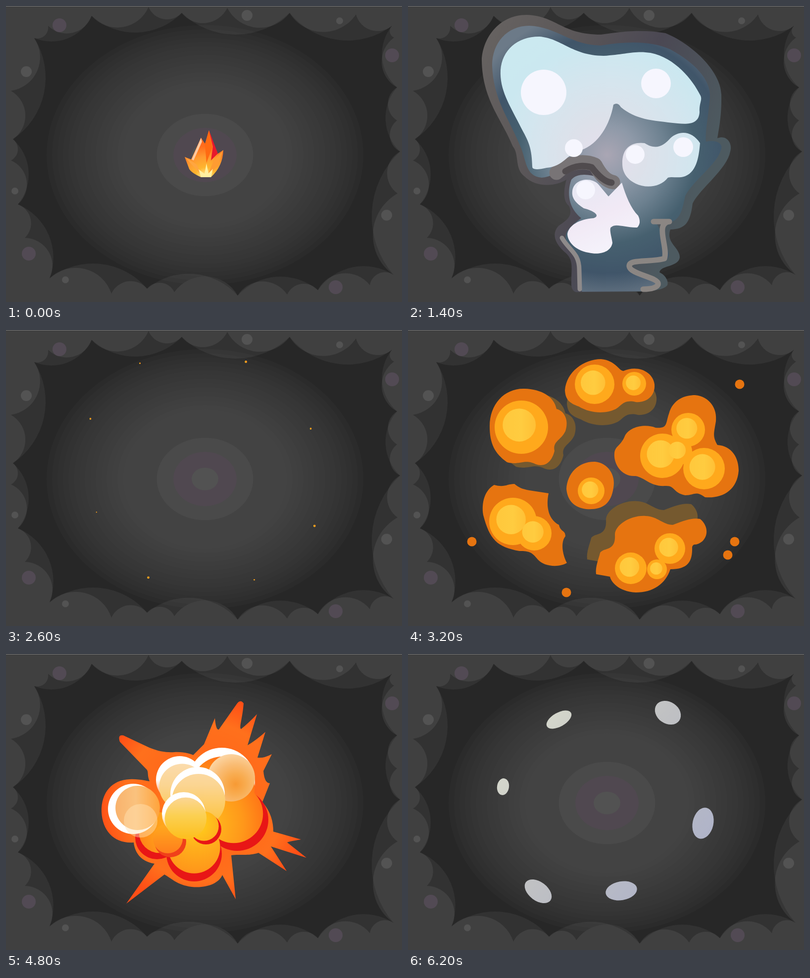
Recreate the animation shown at these times as an HTML page with a canvas. Size 800 by 600 pixels, loop 6.3 s.

```html
<!DOCTYPE html>
<html lang="en">
<head>
<meta charset="utf-8">
<title>Blasts</title>
<style>
html, body { margin: 0; width: 100%; height: 100%; overflow: hidden; background: #272727; }
canvas { display: block; width: 800px; height: 600px; }
</style>
</head>
<body>
<canvas id="stage" width="800" height="600"></canvas>
<script>
const STEP = 100, PER_BLAST = 9, TAU = Math.PI * 2;
const screen = document.getElementById('stage').getContext('2d');
let g = screen;

const noise = n => { const v = Math.sin(n * 12.9898) * 43758.5453; return v - Math.floor(v); };
const cache = {};
const shape = d => cache[d] || (cache[d] = new Path2D(d));
function fill(d, color, rule = 'nonzero') { g.fillStyle = color; g.fill(shape(d), rule); }
function line(d, color, width) { g.strokeStyle = color; g.lineWidth = width; g.stroke(shape(d)); }
function oval(x, y, rx, ry, color, turn = 0) {
  g.fillStyle = color;
  g.beginPath();
  g.ellipse(x, y, rx, ry, turn, 0, TAU);
  g.fill();
}
const disc = (x, y, r, color) => oval(x, y, r, r, color);
function stops(grad, colors) {
  colors.forEach((c, i) => grad.addColorStop(i / (colors.length - 1), c));
  return grad;
}
const radial = (x, y, r, ...colors) => stops(g.createRadialGradient(x, y, 0, x, y, r), colors);
const linear = (x0, y0, x1, y1, ...colors) => stops(g.createLinearGradient(x0, y0, x1, y1), colors);

// Draws a part moved away from the middle and resized about its own centre.
function part([x, y], { spread, size }, draw) {
  g.save();
  g.translate(400 + (x - 400) * spread, 300 + (y - 300) * spread);
  g.scale(size, size);
  g.translate(-x, -y);
  draw();
  g.restore();
}
const zoom = (size, draw) => part([400, 300], { spread: 1, size }, draw);
const middle = items => [0, 1].map(k => items.reduce((sum, it) => sum + it[k], 0) / items.length);

// Grows until the peak step, then drifts on and shrinks away.
function burst(i, peak, drift = .04) {
  const p = (i + 1) / (peak + 1), late = i - peak;
  return late <= 0
    ? { spread: Math.sin(p * TAU / 4), size: Math.sqrt(p) }
    : { spread: 1 + drift * late, size: 1 - late / (PER_BLAST - peak) };
}

// --- cave ---
const cusps = [[57,65],[85,40],[173,20],[288,2],[355,14],[447,4],[573,14],[707,17],[780,40],[784,64],
  [790,165],[790,232],[796,295],[791,380],[783,545],[735,566],[630,576],[568,585],[468,587],[340,580],
  [285,573],[213,583],[88,552],[38,470],[24,402],[10,313],[14,270],[10,172]];
const bubbles = [[108,39],[780,100],[46,502],[666,570],[487,19],[41,133],[769,424],[674,30],[18,375],[120,555]];

// The wall around the opening: arcs bulging inward from cusp to cusp.
function wall(points, curve) {
  const arcs = points.map(([x, y], i) => {
    const [u, v] = points[(i + 1) % points.length], r = curve * Math.hypot(u - x, v - y);
    return `A${r} ${r} 0 0 0 ${u} ${v}`;
  });
  return `M0 0H800V600H0ZM${points[0]}${arcs.join('')}Z`;
}
function cave() {
  g.fillStyle = '#272727';
  g.fillRect(0, 0, 800, 600);
  for (let i = 0; i <= 14; i++) {
    const r = 320 - i * 11, v = Math.round(43 + 24 * Math.pow(i / 14, .8));
    oval(402, 302, r, r * (.88 - r * .00018), `rgb(${v},${v},${v})`);
  }
  oval(402, 302, 97.5, 83.5, '#4a4a4a');
  oval(402, 302, 64, 55, '#504850');
  oval(402, 302, 27, 23, '#525252');
  fill(wall(cusps, .59), '#363636', 'evenodd');
  fill(wall(cusps.filter((_, i) => i % 2 === 0), .72), 'rgba(255,255,255,.05)', 'evenodd');
  bubbles.forEach(([x, y], i) => disc(x, y, i < 4 ? 14 : i < 7 ? 11 : 7, i < 4 ? '#524a54' : '#535353'));
  g.fillStyle = '#777';
  g.fillRect(0, 0, 800, 1);
}

// --- shared puffs ---
function moon(x, y, r, rim, body, dx, dy, k = .94) {
  disc(x, y, r, rim);
  disc(x + dx, y + dy, r * k, body);
}
const FIRE = ['#ff7a1e', '#e81818', '#ffa41a', '#ffd23c'];
const FROST = ['#64646a', '#5d7486', '#cfe6ef', '#f6f5fd'];
function ring(n, spread, size, [edge, rim, body, light], turn) {
  const puffs = Array.from({ length: n }, (_, i) => {
    const a = i / n * TAU + turn, k = .85 + .15 * noise(i + turn);
    return [400 + Math.cos(a) * spread * k, 300 + Math.sin(a) * spread * k * .9, size * (.7 + .3 * noise(i * 3 + turn))];
  });
  puffs.forEach(([x, y, r]) => disc(x, y, r, edge));
  puffs.forEach(([x, y, r]) => {
    moon(x, y, r * .85, rim, body, -r * .06, -r * .1, .88);
    disc(x - r * .15, y - r * .2, r * .45, light);
  });
}

// --- crystal flame ---
function crystal() {
  fill('M361 306L374 311 394 267 402 279 410 252 427 300 439 292Q438 325 414 347L394 347Q374 338 370 330Z',
    radial(403, 348, 85, '#fff8b0', '#ffb52e', '#ff9a30', '#ff6d1c', '#ff651c'));
  fill('M410 252L428 299 414 313 418 285Z', '#e8182c');
  fill('M394 267L375 311 379 313 396 275Z', '#ffc9a0');
  fill('M410 252L402 281 405 318 416 288Z', '#ff6a12');
  fill('M361 306L385 321 397 345Z', '#ffa640');
  fill('M439 292L420 313 406 345 428 325Z', '#ff9c32');
  fill('M394 347L389 331 401 340 405 319 409 339 418 330 414 347Z', '#fff0a0');
}

// --- frosty blast ---
const highlights = [[274,175,46],[501,157,30],[335,288,18],[459,301,19],[556,286,20],[359,373,19]];
function frost() {
  fill('M149 110C150 70 180 18 240 18C300 20 310 58 390 58C440 50 480 48 520 55C570 75 632 130 633 180C634 220 628 250 625 268C645 260 656 280 651 295C645 330 590 370 575 400C570 440 560 452 530 453C520 480 550 490 549 510C545 530 510 525 508 540C520 545 527 558 524 566C515 578 480 578 470 579L340 580Q329 578 330 560C330 530 335 515 318 500C295 480 290 460 305 445C320 435 335 425 325 405C312 395 315 370 320 352C300 365 260 370 235 345C215 330 225 300 212 285C190 230 150 190 149 110Z',
    linear(150, 0, 650, 200, '#686462', '#5c5859', '#4b4853', '#4d5a60'));
  fill('M170 120C170 75 200 40 245 40C300 42 330 80 390 80C440 72 490 70 530 88C580 115 612 150 610 185C606 230 600 255 602 275C625 270 638 280 632 292C625 320 575 355 560 385C553 420 548 438 520 440C495 432 500 435 510 455C520 490 535 505 522 514C480 516 448 512 450 530C455 545 515 550 508 566Q500 577 470 578L352 579Q344 570 346 550C348 520 340 500 322 482C310 460 330 445 350 430C325 410 320 380 330 352C350 330 395 350 410 360C400 330 385 310 355 310C320 318 305 345 270 348C235 345 240 310 225 280C205 230 172 190 170 120Z',
    radial(402, 302, 300, '#aaa6b4', '#8e99a8', '#6d8190', '#46606f', '#405569', '#6c7a88'));
  line('M300 338C322 316 355 312 378 322C390 345 402 355 414 357', '#787476', 29);
  line('M318 335C340 322 355 323 371 327C385 345 398 357 411 358', '#504b4e', 13);
  const pale = radial(402, 302, 300, '#e6deec', '#dde1ea', '#d5e5ee', '#cbe8f0', '#cbe9f0');
  fill('M187 130C190 90 220 62 265 62C310 65 330 100 395 101C440 98 460 90 490 95C540 105 575 150 590 180C596 190 588 195 589 215C588 240 565 240 545 238C490 232 460 230 430 205Q424 194 415 200C408 240 385 280 350 292C320 300 315 325 280 328Q250 335 251 325C250 280 240 270 225 240C205 200 185 170 187 130Z', pale);
  fill('M433 320C432 285 455 275 478 278C500 292 515 285 530 268C550 250 575 255 590 278C588 300 585 335 560 345C545 350 535 345 525 348C510 368 480 370 460 360C440 350 433 335 433 320Z', pale);
  fill('M332 375C335 350 370 345 385 362L405 386 432 358C440 385 450 410 465 425Q472 440 463 449C440 450 420 440 411 448C405 450 412 470 413 480C410 500 385 505 365 500C335 495 322 475 322 462C325 445 345 432 375 430C390 425 375 415 355 410C340 400 330 390 332 375Z',
    linear(340, 360, 400, 500, '#e6e8f3', '#f1e9f5', '#f5f3fb'));
  line('M496 437L528 437C498 440 526 490 518 512C490 520 445 512 447 528C450 545 510 550 505 565Q500 574 475 574', '#8b8683', 11);
  line('M311 470C325 495 346 500 346 535L347 574', '#8e8a8a', 9);
  highlights.forEach(([x, y, r]) => disc(x, y, r, '#f6f6fe'));
}

// --- spark ---
const HUB = [405, 288];
const rays = [[375,133],[491,216],[533,283],[469,360],[406,468],[341,342],[259,282],[339,233]];
const balls = [[316,149,10],[455,147,16.5],[540,235,13],[545,363,16.5],[466,434,10],[327,431,16.5],[259,345,8],[251,222,13]];

// A star along the rays; reach turns a ray's length into the tip's distance.
function addStar(reach, pull) {
  const tips = rays.map(([x, y]) => {
    const dx = x - HUB[0], dy = y - HUB[1], len = Math.hypot(dx, dy), k = reach(len) / len;
    return [HUB[0] + dx * k, HUB[1] + dy * k];
  });
  g.moveTo(...tips[0]);
  tips.forEach((tip, i) => {
    const next = tips[(i + 1) % tips.length];
    const bend = HUB.map((c, k) => c * pull + (tip[k] + next[k]) / 2 * (1 - pull));
    g.quadraticCurveTo(...bend, ...next);
  });
  g.closePath();
}
function star(reach, pull, color, edge) {
  g.beginPath();
  addStar(reach, pull);
  addStar(() => 48, .35);
  g.fillStyle = g.strokeStyle = color;
  g.lineWidth = edge;
  g.fill('evenodd');
  g.stroke();
}
function spark() {
  star(len => len, .93, radial(...HUB, 182, '#fff', '#faf3cc', '#f9ea80', '#fbdf3e', '#fbd932', '#f5b71e'), 2.5);
  star(len => 45 + len * .22, .45, '#fff', 1);
}
function ball(x, y, r) {
  disc(x, y, r, linear(x - r, 0, x + r, 0, '#ffd21c', '#ffac20', '#ff8c1e'));
  disc(x - r * .15, y - r * .18, r * .5, '#ff891c');
}

// --- lava: outline, inner ovals, shade offset ---
const lava = [
  ['M165 195C165 150 195 118 235 119C270 120 295 135 300 160C318 165 325 185 318 205C308 225 292 225 296 245C290 270 275 278 258 272C235 260 225 275 200 268C175 250 165 230 165 195Z',[[229,197,54]],[18,9]],
  ['M317 122C320 85 355 59 390 59C420 62 425 82 435 83C465 70 495 85 498 110C500 135 480 148 460 146C435 140 430 155 420 160C400 170 370 170 345 155C325 148 318 140 317 122Z',[[377,110,40],[457,109,24]],[4,26]],
  ['M417 250C418 235 430 235 438 215C448 195 480 190 500 198C525 200 520 190 527 170C535 140 560 132 580 132C610 135 625 160 622 185C618 210 615 215 625 233C655 235 668 260 668 285C665 325 635 342 600 339C580 325 580 335 560 335C535 330 540 315 520 316C490 318 480 300 460 296C430 298 415 270 417 250Z',[[514,255,45],[566,202,34],[598,281,42],[546,246,28]]],
  ['M174 314C195 320 200 312 215 312C225 320 230 322 245 325L284 331C278 360 285 385 305 395C308 410 318 405 318 418C308 430 312 455 321 472C305 482 275 480 262 465C250 450 245 448 225 448C180 440 165 425 152 375C148 350 155 325 174 314Z',[[212,388,48],[255,412,35]]],
  ['M418 415C418 395 450 375 480 377C505 378 515 395 535 395C560 385 575 380 590 383C605 395 608 415 595 428C580 440 578 430 574 440C575 470 565 485 530 485C520 515 495 532 460 532C425 530 410 510 408 500L380 495C378 480 385 465 388 452C395 440 420 450 418 415Z',[[450,483,32],[529,443,31],[503,485,20]],[-18,-30]],
  ['M320 322C322 290 345 266 378 267C405 270 420 295 415 320C410 355 390 365 360 363C335 360 322 345 320 322Z',[[370,326,27]]]
];
const drops = [[670,110],[129,429],[660,429],[646,456],[320,532]];
function lavaBurst(pose) {
  lava.forEach(([d, ovals, shade]) => part(middle(ovals), pose, () => {
    if (shade) {
      g.save();
      g.translate(...shade);
      fill(d, '#75592f');
      g.restore();
    }
    fill(d, '#e67410');
    ovals.forEach(([x, y, r]) => disc(x, y, r, '#ffa91c'));
    ovals.forEach(([x, y, r]) => disc(x - r * .08, y - r * .08, r * .62,
      linear(x - r, y, x + r, y, '#ffc63a', '#ffcc40', '#ffb52c')));
  }));
  drops.forEach(([x, y]) => part([x, y], pose, () => disc(x, y, 9.5, '#e67410')));
}

// --- bone-coloured smoke: outline, orbs, gaps ---
const smoke = [
  ['M159 160C158 120 190 95 230 98C250 80 290 75 305 100L346 228C335 238 325 225 312 262Q295 270 275 255L210 217C175 210 160 190 159 160Z',[[217,160,47],[272,132,33]],'M285 195C285 178 315 180 325 195L342 233 330 236C325 205 312 210 315 230L318 250C305 240 300 222 285 195Z'],
  ['M352 90C352 60 375 45 398 49C410 25 455 18 478 45C490 65 490 72 500 75C530 78 540 110 532 130C520 160 495 155 470 190L425 209 411 208C412 180 400 160 385 145C360 130 352 110 352 90Z',[[393,95,40],[437,85,50],[488,115,37]],'M424 208C425 180 440 145 458 148C475 152 468 175 463 195L455 197C458 180 455 165 445 175C438 185 435 200 432 207Z'],
  ['M508 188C530 180 535 145 560 143C585 145 585 165 578 180C583 200 565 210 550 205L515 206Z',[[563,162,18],[562,190,15]],'M510 190C525 180 535 178 538 185C530 195 525 198 514 202Z'],
  ['M495 300L520 276 515 270C540 265 555 250 570 240C580 215 610 208 632 217C655 228 658 245 655 260C680 285 685 340 660 365C645 385 620 375 615 400C600 420 560 420 540 410C530 390 530 360 520 330C515 310 505 305 495 300Z',[[615,248,32],[577,370,40],[614,310,57]],'M515 270C520 285 550 270 550 285C550 305 520 305 497 303L508 297C530 300 535 288 520 290C510 288 512 278 515 270Z'],
  ['M360 520C362 470 395 440 402 398L408 396C412 410 425 420 436 387C450 395 455 415 465 420C478 425 485 405 485 408C530 415 560 450 562 490C560 540 530 568 490 565C470 560 460 555 450 558C435 575 410 575 395 570C370 560 360 540 360 520Z',[[505,495,56],[415,515,50],[444,487,53]],'M402 400L410 397C412 430 420 440 430 395L433 390C425 430 425 470 410 471C395 465 400 440 402 400ZM437 390C450 410 455 425 470 428C480 425 480 410 487 410C488 430 485 455 465 455C445 450 440 420 437 390Z'],
  ['M236 465C238 440 265 440 286 410L292 412 300 425 312 410 320 415 335 410C342 430 342 460 343 485C335 510 315 510 300 500C285 512 260 510 250 500C240 490 235 480 236 465Z',[[275,470,34],[319,480,20]],'M287 412C290 430 305 420 312 412L315 418 336 410 325 440Q312 455 311 430C300 460 280 460 279 450Z'],
  ['M122 320C122 295 145 285 150 262C165 245 195 245 210 262L249 293C248 300 240 310 247 322L276 333C272 345 262 345 262 350L269 368C255 385 235 400 235 410C215 430 180 435 165 415C155 400 155 385 152 375C130 360 122 340 122 320Z',[[167,326,41],[183,282,31],[198,385,38],[193,357,25]],'M249 296C230 295 210 300 212 315C218 330 240 325 247 325L244 318C235 315 240 305 249 296ZM274 333C255 340 235 340 234 352C238 368 260 362 268 368L260 350C258 345 270 345 274 333Z']
];
// Orbs near the top or the left catch cold light, the others fall into shade.
function orb([x, y, r]) {
  if (y < 340 || x < 250) {
    disc(x, y, r, linear(x - r, y - r, x + r, y + r, '#c4f3f8', '#c8eff2', '#b9b29e'));
    disc(x + r * .08, y + r * .06, r * .9, linear(x - r, y - r, x + r, y + r, '#c6ecf0', '#cadcd7', '#d0ccb7'));
  } else {
    disc(x, y, r, '#9d9482');
    disc(x - r * .08, y - r * .13, r * .89, radial(x - r * .1, y - r * .1, r, '#d5cbb7', '#cac1ad', '#c3baa7'));
  }
}
function smokeBurst(pose) {
  smoke.forEach(([d, orbs, gap]) => part(middle(orbs), pose, () => {
    fill(d, '#d8d4bc');
    orbs.forEach(orb);
    fill(gap, '#908675');
  }));
}

// --- fireball ---
function fireball() {
  fill('M193 320C192 280 215 255 250 254C270 253 285 258 290 258C285 245 288 240 285 235L230 178Q225 163 237 165L290 190C310 198 325 200 340 199C360 198 375 203 378 205L400 183 422 130Q424 155 430 153L465 103Q473 90 480 100C478 130 470 150 475 152Q490 140 507 122L488 185Q505 175 524 158L508 210Q520 212 537 203L520 237Q522 262 533 262L518 300C535 320 540 340 540 360L596 376Q570 380 568 382L607 413 535 390 567 440 510 403C490 410 470 405 455 408L464 497 437 448C430 465 405 475 375 472C345 468 335 455 320 447L243 506 300 425C270 420 260 400 258 382C220 385 195 360 193 320Z',
    radial(400, 300, 215, '#ff8a1c', '#ff801c', '#ff6a1a', '#ff701c', '#ff4e16'));
  const red = '#e81616';
  const ember = radial(385, 345, 140, '#ffd21c', '#ffb01c', '#ff981a', '#ff7416');
  const cream = linear(0, 220, 0, 400, '#fbdcae', '#fbd593', '#fccb62', '#fdbe2c', '#ffa61c');
  const peach = linear(215, 0, 310, 0, '#f8b06a', '#fac27e', '#ffa43c');
  const cap = (y, r) => linear(0, y - r, 0, y + r, '#fff', '#fff', 'rgba(255,255,255,0)');
  moon(467, 336, 63, red, ember, -7, -12);
  moon(380, 405, 56, red, ember, 0, -13);
  moon(305, 372, 44, red, ember, 5, -10);
  moon(436, 257, 67, cap(257, 67), ember, 2, 15, .96);
  moon(351, 255, 48, cap(255, 48), cream, 5, 14, .97);
  moon(257, 314, 51, '#fff', peach, 9, -2, .88);
  disc(272, 338, 34, 'rgba(255,226,180,.45)');
  disc(455, 251, 48, radial(464, 264, 62, '#f79a34', '#f8ac50', '#f9bd76', '#fbd3a0'));
  moon(387, 284, 55, cap(284, 55), cream, 2, 13, .98);
  moon(404, 355, 31, red, ember, -4, -6, .96);
  moon(332, 380, 32, '#f0401a', linear(0, 350, 0, 410, '#ffa61e', '#ff7a1c'), -5, -6);
  moon(359, 324, 44, cap(324, 44), linear(0, 285, 0, 370, '#fbd7a0', '#fbd052', '#fdc022'), 4, 9, .96);
}

// --- pale chips, lying along the circle they fly on ---
const chips = [[305,133,28,14],[525,119,28,22],[192,269,17,12],[596,343,32,21],[263,481,31,19],[431,480,32,19]];
function chipBurst(pose) {
  const tone = linear(220, 150, 560, 420, '#d8dacd', '#c0c1c3', '#b0b4c8');
  chips.forEach(([x, y, rx, ry]) => part([x, y], pose, () =>
    oval(x, y, rx, ry, tone, Math.atan2(y - 300, x - 400) + TAU / 4)));
}

// --- timeline: one function per blast, called with its step ---
const fade = (from, i) => from * (1 - i / 7);
const blasts = [
  i => i < 3 ? zoom(1 + i * .9, crystal) : ring(9, 60 + (i - 3) * 36, fade(70, i - 3), FIRE, .4),
  i => i < 6 ? zoom(burst(i, 5).spread, frost) : ring(8, 190 + (i - 6) * 22, fade(70, i - 3), FROST, 1.1),
  i => {
    const pose = burst(i, 2, .09);
    if (i < 4) zoom(pose.spread, spark);
    balls.forEach(b => part(b, pose, () => ball(...b)));
  },
  i => lavaBurst(burst(i, 5)),
  i => smokeBurst(burst(i, 6)),
  i => i < 4 ? zoom(burst(i, 3).spread, fireball) : ring(8, 105 + (i - 4) * 16, fade(70, i - 3), FIRE, .8),
  i => chipBurst({ spread: burst(i, 8).spread, size: 1 + 2 * Math.sin(i / 8 * Math.PI) })
];

const back = document.createElement('canvas');
back.width = 800;
back.height = 600;
g = back.getContext('2d');
cave();
g = screen;
g.lineCap = g.lineJoin = 'round';

const start = performance.now(), total = blasts.length * PER_BLAST;
let shown = -1;
function tick() {
  const step = Math.floor((performance.now() - start) / STEP) % total;
  if (step !== shown) {
    shown = step;
    g.drawImage(back, 0, 0);
    blasts[Math.floor(step / PER_BLAST)](step % PER_BLAST);
  }
  requestAnimationFrame(tick);
}
tick();
</script>
</body>
</html>
```
